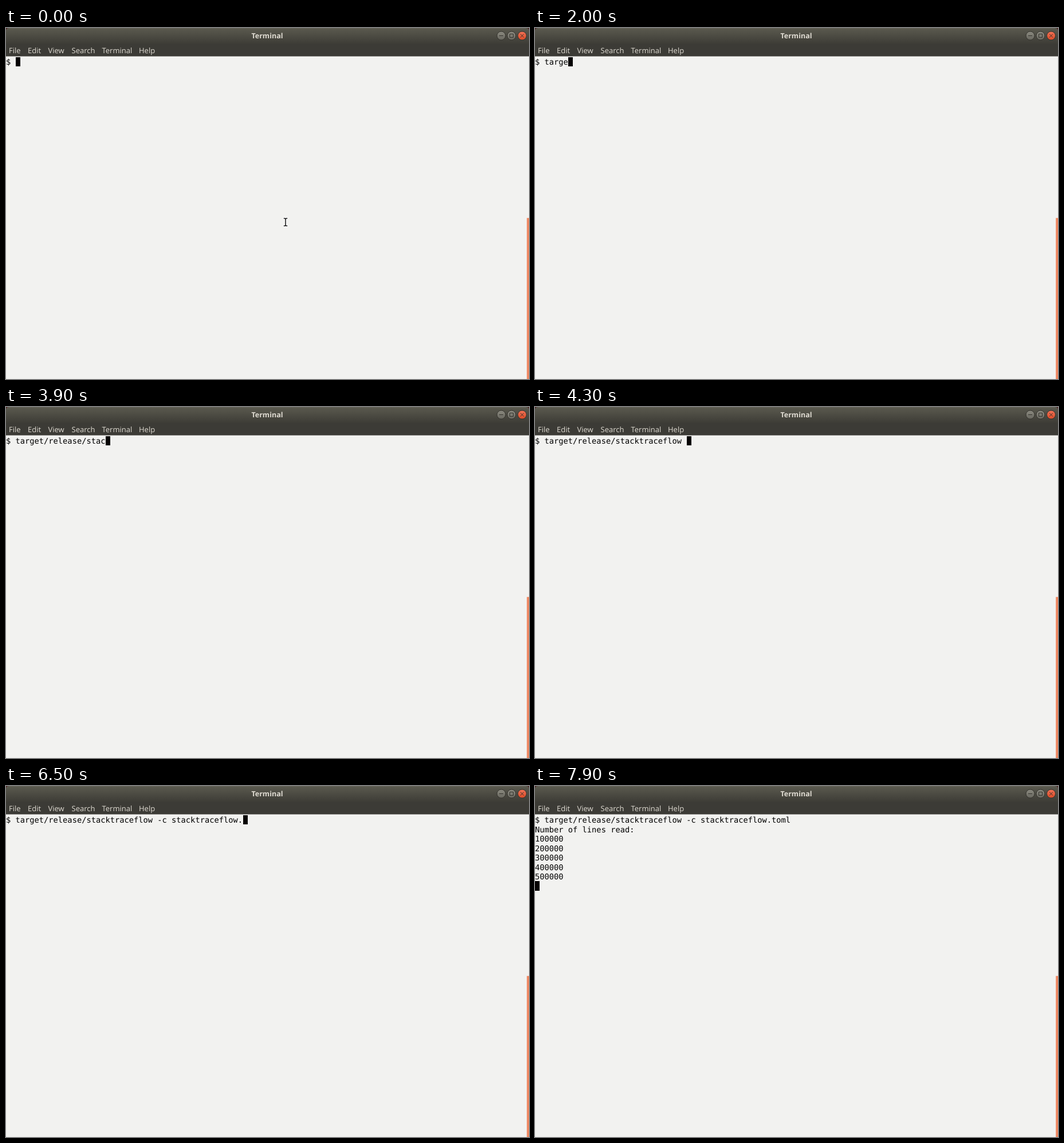
Recreate the animation shown at these times as an HTML page. Size 913x613 px, loop 8000 ms.

```html
<!DOCTYPE html>
<html lang="en">
<head>
<meta charset="utf-8">
<title>Terminal</title>
<style>
  html, body { margin: 0; width: 100%; height: 100%; overflow: hidden; background: #f2f2f0; }
  #stage { position: relative; width: 913px; height: 613px; overflow: hidden; }
  svg { position: absolute; left: 0; top: 0; }
  .ui { font: 13px "Open Sans", "Noto Sans", sans-serif; fill: #dfdbd2; text-rendering: geometricPrecision; }
  .title { font-size: 12.5px; font-weight: 700; text-anchor: middle; }
  #screen {
    position: absolute; left: 0; top: 52px; margin: 0; color: #000;
    font: 13.737px/16.55px "DejaVu Sans Mono", monospace;
    text-rendering: geometricPrecision;
  }
  #cursor { position: absolute; left: 0; top: 0; width: 8.27px; height: 16.55px; background: #050202; }
</style>
</head>
<body>
<div id="stage">
  <svg width="913" height="613" viewBox="0 0 913 613">
    <defs>
      <linearGradient id="bar" x2="0" y2="1">
        <stop offset="0" stop-color="#5b5a4f"/>
        <stop offset="1" stop-color="#3d3c36"/>
      </linearGradient>
      <linearGradient id="gray" x2="0" y2="1">
        <stop offset="0" stop-color="#8b8a80"/>
        <stop offset="1" stop-color="#67665e"/>
      </linearGradient>
      <linearGradient id="red" x2="0" y2="1">
        <stop offset="0" stop-color="#f37458"/>
        <stop offset="1" stop-color="#dc4a26"/>
      </linearGradient>
      <path id="beam" d="M485.5 332.5H487L488 333.5L489 332.5H490.5M488 333.5V344.5M485.5 345.5H487L488 344.5L489 345.5H490.5"/>
    </defs>
    <path d="M0 0H913V8H0Z" fill="#4a1c20"/>
    <path d="M0 28V5Q0 0 5 0H908Q913 0 913 5V28Z" fill="url(#bar)"/>
    <path d="M5 .5H908" stroke="#66655a"/>
    <path d="M0 28H913V49.5H0Z" fill="#3c3b36"/>
    <text class="ui title" x="456" y="18">Terminal</text>
    <g id="menu" class="ui"></g>
    <g stroke="#33322d" stroke-width="1">
      <circle cx="864.5" cy="13.5" r="7.5" fill="url(#gray)"/>
      <circle cx="882.5" cy="13.5" r="7.5" fill="url(#gray)"/>
      <circle cx="901" cy="13.5" r="7.5" fill="url(#red)"/>
      <path d="M861 13.5H868M879.5 10.5H885.5V16.5H879.5ZM898 10.5L904 16.5M904 10.5L898 16.5" fill="none"/>
    </g>
    <path d="M909.2 331.7H913V613H909.2Z" fill="#ef8862"/>
    <g id="pointer" fill="none" stroke-linecap="square">
      <use href="#beam" stroke="#fff" stroke-width="3.4"/>
      <use href="#beam" stroke="#111" stroke-width="1.5"/>
    </g>
  </svg>
  <pre id="screen"></pre>
  <div id="cursor"></div>
</div>
<script>
const LOOP = 8000, CELL = 8.27, ROW = 16.55, TOP = 50.6;
const command = "$ target/release/stacktraceflow -c stacktraceflow.toml ";
const heading = "\nNumber of lines read:\n";
const counts = [1, 2, 3, 4, 5].map(n => n * 100000 + "\n").join("");

// [start in ms, characters on the command line, cursor hidden]
const typing = [
  [0, 2], [300, 2, true], [900, 2], [1000, 3], [1100, 4], [1200, 5],
  [1500, 6], [2000, 7], [2500, 8], [2600, 10], [2800, 11], [3000, 13],
  [3400, 17], [3500, 20], [3900, 21], [4000, 22], [4200, 23], [4300, 32],
  [4900, 33], [5000, 34], [5500, 35], [5600, 38], [5900, 40], [6500, 50],
  [6700, 50, true], [6900, 51], [7000, 52], [7500, 53], [7600, 55]
];
const steps = typing.map(([at, n, hidden]) => ({ at, text: command.slice(0, n), hidden }));
steps.push({ at: 7800, text: command + heading });
steps.push({ at: 7900, text: command + heading + counts });

const $ = id => document.getElementById(id);
const menu = { File: 5, Edit: 38, View: 73.5, Search: 114.5, Terminal: 167.5, Help: 232 };
for (const [label, x] of Object.entries(menu)) {
  const item = document.createElementNS("http://www.w3.org/2000/svg", "text");
  item.setAttribute("x", x);
  item.setAttribute("y", 44.4);
  item.textContent = label;
  $("menu").append(item);
}

let shown;
function draw(time) {
  const t = time % LOOP;
  const step = steps.findLast(s => s.at <= t);
  if (step === shown) return;
  shown = step;
  const lines = step.text.split("\n");
  const cursor = $("cursor").style;
  $("screen").textContent = step.text;
  cursor.left = lines.at(-1).length * CELL + "px";
  cursor.top = TOP + (lines.length - 1) * ROW + "px";
  cursor.visibility = step.hidden ? "hidden" : "visible";
  $("pointer").style.visibility = t < 1000 ? "visible" : "hidden";
}

const start = performance.now();
function tick() {
  draw(performance.now() - start);
  requestAnimationFrame(tick);
}
tick();
</script>
</body>
</html>
```
